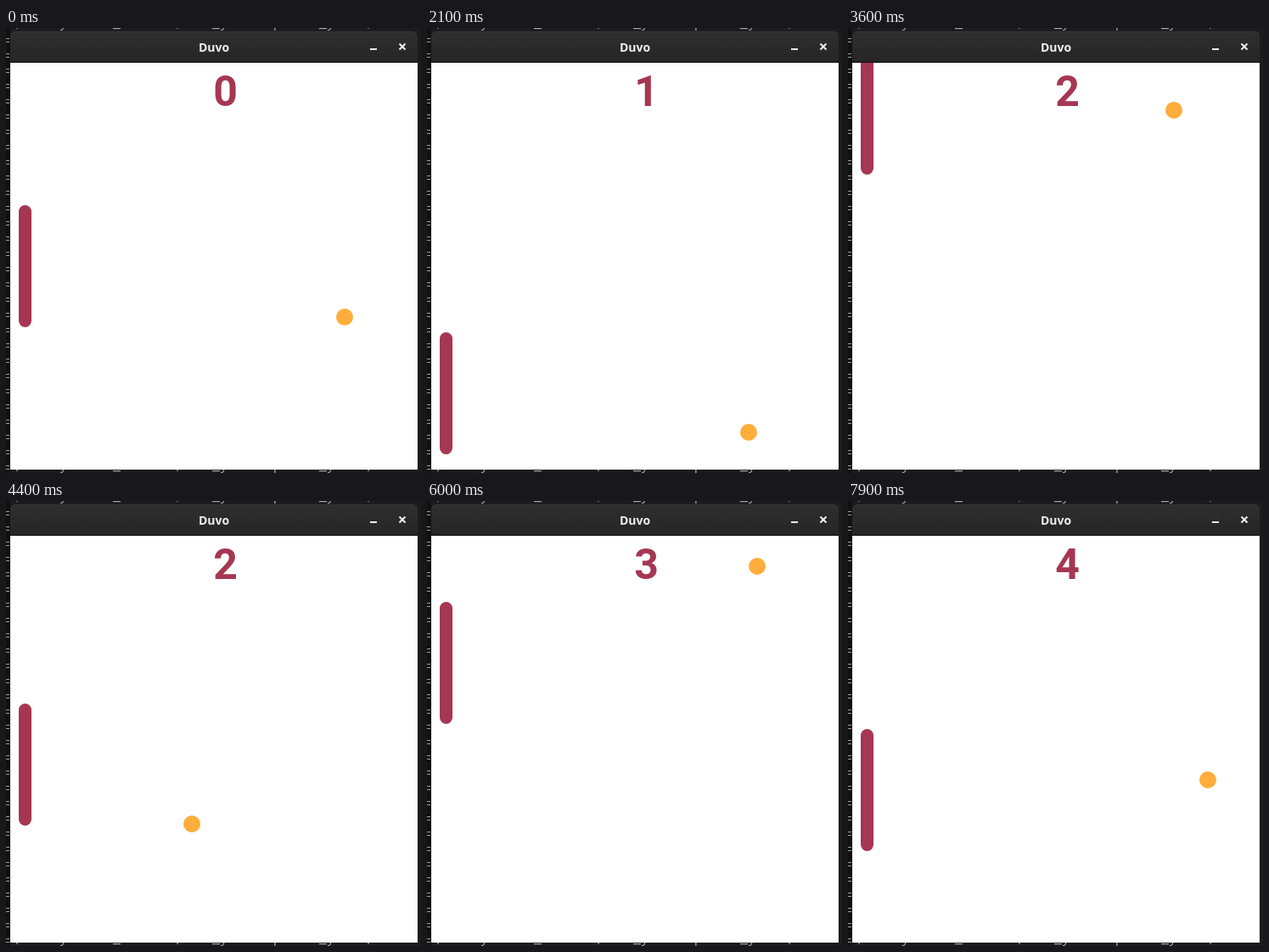
An HTML page that plays this animation: 489x525 px, repeating every 8000 ms.

```html
<!DOCTYPE html>
<html lang="en">
<head>
<meta charset="utf-8">
<title>Duvo</title>
<style>
html, body { margin: 0; width: 100%; height: 100%; overflow: hidden; background: #1c1c1c; }
svg { display: block; }
text { white-space: pre; }
.mono { font: 15px "Noto Sans Mono", "DejaVu Sans Mono", monospace; fill: #a8a8a8; }
.title { font: bold 14px "Noto Sans", "Open Sans", sans-serif; fill: #eee; text-anchor: middle; }
.score { font: bold 50px Roboto, "Liberation Sans", sans-serif; text-anchor: middle; }
</style>
</head>
<body>
<svg width="489" height="525" viewBox="0 0 489 525">
  <defs>
    <linearGradient id="bar" x2="0" y2="1">
      <stop stop-color="#2f2f2f"/><stop offset="1" stop-color="#252525"/>
    </linearGradient>
    <pattern id="marks" y="12" width="5" height="18" patternUnits="userSpaceOnUse">
      <path d="M0 .5H4M0 4.5H4" stroke="#a0a0a0"/>
    </pattern>
  </defs>
  <rect width="489" height="525" fill="#1c1c1c"/>
  <rect width="5" height="525" fill="#111"/>
  <rect y="8" width="5" height="513" fill="url(#marks)"/>
  <g class="mono">
    <text y="-1"> ,  body  ball_x start, dot_y tall poster_y end,</text>
    <text y="521"> ,  body  ball_x start, dot_y tall poster_y end,</text>
  </g>

  <svg x="5" y="41" width="480" height="480">
    <rect width="480" height="480" fill="#fff"/>
    <g fill="#a63752">
      <text id="score" class="score" x="253.5" y="50.5"></text>
      <rect id="paddle" x="10" width="15" height="144" rx="7.5"/>
    </g>
    <circle id="ball" r="10" fill="#ffad3b"/>
  </svg>

  <path d="M5 41V10Q5 4 11 4H479Q485 4 485 10V41Z" fill="url(#bar)"/>
  <path d="M5 40.5H485" stroke="#0c0c0c"/>
  <path d="M10 4.5H480" stroke="#383838"/>
  <text class="title" x="245" y="28">Duvo</text>
  <path d="M429 25H437M463.5 18.5L470.5 25.5M470.5 18.5L463.5 25.5" stroke="#eee" stroke-width="2"/>
</svg>
<script>
const LOOP = 8000, STEP = 100;
const ball = document.getElementById("ball");
const paddle = document.getElementById("paddle");
const score = document.getElementById("score");

// Game ticks by time in ms: a steady pace with one short slowdown
const PACE = [[0, 0], [1200, 110], [1800, 153], [3600, 317], [7900, 699]];
// Paddle row by time in ms, where the player stops or turns
const MOVES = [[0, 5], [700, 0], [1200, 0], [2100, 10], [3600, -1],
  [4800, 10], [6100, 1], [6800, 4], [7900, 7]];

function at(keys, t) {
  const i = Math.max(1, keys.findIndex(k => k[0] >= t));
  const [t0, a] = keys[i - 1], [t1, b] = keys[i];
  return Math.round(a + (b - a) * (t - t0) / (t1 - t0));
}

// Ticks away from a wall, when the opposite wall is `span` ticks off
function bounce(n, span) {
  const period = 2 * span, k = (n % period + period) % period;
  return Math.min(k, period - k);
}

function draw(now) {
  const t = Math.floor(now % LOOP / STEP) * STEP;
  const n = at(PACE, t);
  ball.setAttribute("cx", 34 + 5 * bounce(n - 72, 88));
  ball.setAttribute("cy", 8 + 4 * bounce(n - 73, 116));
  paddle.setAttribute("y", 18 + 30 * at(MOVES, t));
  // One point per return off the paddle
  score.textContent = Math.floor((n + 104) / 176);
  requestAnimationFrame(draw);
}
draw(0);
</script>
</body>
</html>
```
